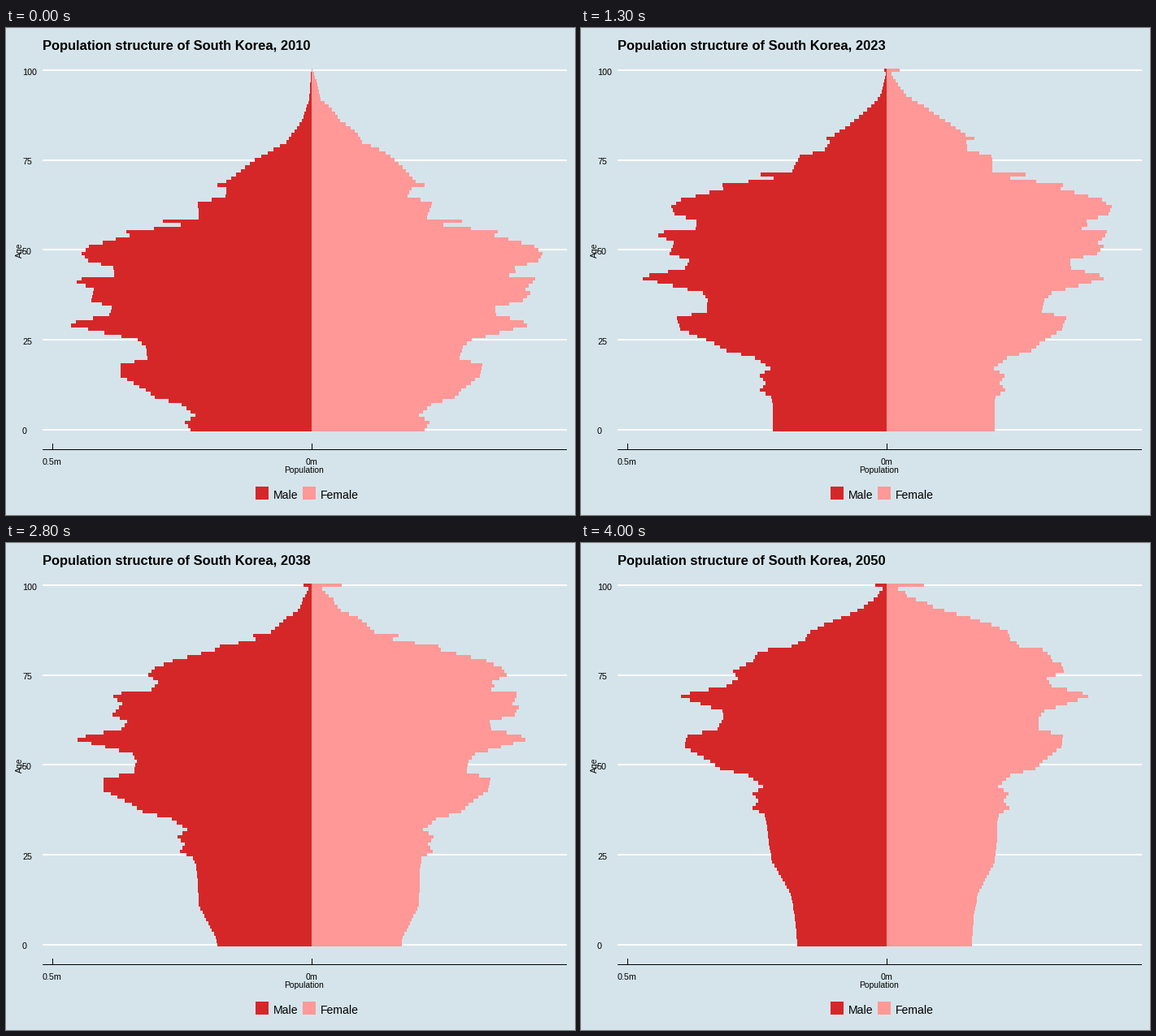
These frames come from a looping animation (700x600 px, 4100 ms). A matplotlib script:

```python
import math

import matplotlib.pyplot as plt
import numpy as np
from matplotlib.animation import FuncAnimation
from matplotlib.patches import Rectangle

W, H, DPI = 700, 600, 100
START, YEARS = 2010, 41
ZERO_X, TOP_Y, BASE_Y = 376, 52, 495
STEP = (BASE_Y - TOP_Y) / 100
BG, RED, PINK = "#d5e4eb", "#d62728", "#ff9896"
AGES = np.arange(101)

# Turning points of male cohort size: age in the first year (negative for
# those still to be born) and bar length in pixels.
COHORTS = [
    (-40, 110), (-32, 113), (-26, 118), (-17, 139), (-6, 140.5), (-4, 142),
    (-2, 156), (0, 149), (2, 156), (4, 143), (7, 160), (9, 193), (11, 204),
    (15, 235), (18, 235), (20, 202), (23, 204), (25, 214), (29, 296),
    (30, 290), (32, 249), (34, 246), (36, 271), (39, 268), (41, 289),
    (42, 283), (43, 243), (45, 244), (47, 275), (49, 283), (51, 274),
    (54, 224), (55, 228), (57, 161), (58, 183), (59, 139), (63, 140),
    (65, 106), (67, 105), (68, 116), (69, 105), (75, 70), (80, 31),
    (86, 12), (92, 3), (100, .2)]

# Women per man at the start, by age.
WOMEN_PER_MAN = [
    (-10, .95), (0, .935), (10, .91), (15, .88), (25, .92), (29, .895),
    (34, .92), (38, 1), (41, .94), (44, 1.03), (50, 1), (58, 1.01),
    (63, 1.06), (70, 1.25), (75, 1.45), (80, 2), (90, 3.5), (100, 5)]


def through(points, x):
    return np.interp(x, *zip(*points))


def men(age):
    return through(COHORTS, age)


def women(age):
    return men(age) * through(WOMEN_PER_MAN, age)


def project(cohort, risk, growth, migration):
    """Age a population year by year with deaths and young migrants."""
    mid = AGES + .5
    hazard = risk * np.exp(growth * (mid - 77))
    deaths = hazard / (1 + hazard / .9)
    arrivals = migration * np.exp(-((mid - 25) / 6) ** 2)
    people = cohort(AGES)
    history = [people]
    for t in range(1, YEARS):
        kept = people * np.exp(arrivals * math.exp(-t / 35) - deaths)
        people = np.concatenate(([cohort(-t)], kept[:-1]))
        people[-1] += kept[-1]  # the last bar is 100 and over
        history.append(people)
    return np.array(history)


male = project(men, .043, .103, .0125)
female = project(women, .024, .118, .0068)

plt.rcParams["font.family"] = "Liberation Sans"
fig = plt.figure(figsize=(W / DPI, H / DPI), dpi=DPI, facecolor=BG)
ax = fig.add_axes([0, 0, 1, 1])
ax.axis("off")


def box(x, y, w, h, color):
    ax.add_patch(Rectangle((x, y), w, h, fc=color, lw=0, antialiased=False))


def label(x, y, text, px, ha="center", **style):
    return ax.text(x, y, text, fontsize=px * 72 / DPI, ha=ha, va="baseline",
                   color="black", **style)


def bars(color):
    edges = BASE_Y - .09 + STEP * (.5 - np.arange(102))
    return ax.stairs(np.full(101, ZERO_X), edges, baseline=ZERO_X,
                     orientation="horizontal", fill=True, color=color,
                     lw=0, antialiased=False, zorder=2)


for age in range(0, 101, 25):
    y = BASE_Y - STEP * age
    box(45, math.ceil(y - .5) - 1, 645, 2, "white")
    label(20, y + 5.5, str(age), 10.7, "left")

box(45, 519, 645, 1, "black")
for x, text in ((57, "0.5m"), (ZERO_X, "0m")):
    box(x, 512, 1, 7, "black")
    label(x, 538, text, 10.7)

label(366.5, 548, "Population", 10.4)
label(20, 273.5, "Age", 10.4, rotation=90, rotation_mode="anchor")

for x, color, text in ((307, RED, "Male"), (365, PINK, "Female")):
    box(x, 565, 16, 16, color)
    label(x + 21.7, 580, text, 14, "left")

title = label(44.8, 27, "", 16.55, "left", weight="bold")
left_bars, right_bars = bars(RED), bars(PINK)
ax.set_xlim(0, W)
ax.set_ylim(H, 0)


def draw(t):
    title.set_text(f"Population structure of South Korea, {START + t}")
    left_bars.set_data(values=ZERO_X - male[t])
    right_bars.set_data(values=ZERO_X + female[t])
    return title, left_bars, right_bars


anim = FuncAnimation(fig, draw, frames=YEARS, interval=100, repeat=True,
                     repeat_delay=0)
plt.show()
```
